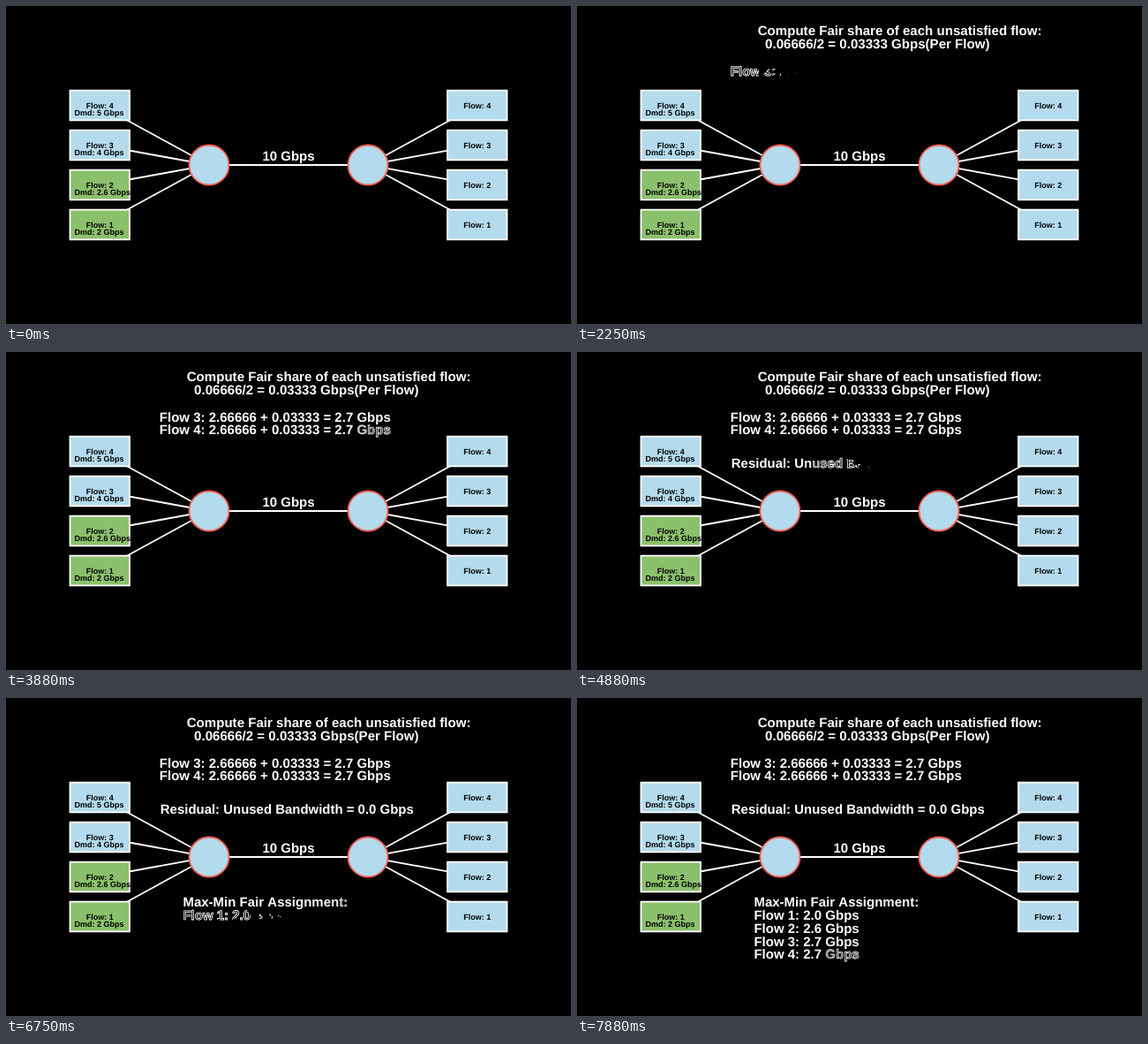
These frames come from a looping animation (640x360 px, 8 s). An HTML page:

```html
<!DOCTYPE html>
<html lang="en">
<head>
<meta charset="utf-8">
<title>Max-min fair share</title>
<style>
  html, body { margin: 0; width: 100%; height: 100%; overflow: hidden; background: #000; }
  svg { display: block; width: 640px; height: 360px; }
  text {
    font: bold 15px "Liberation Sans", Arial, sans-serif;
    font-kerning: none;
    text-rendering: geometricPrecision;
    white-space: pre;
    fill: #fff;
  }
  .label { font-size: 9px; fill: #000; }
  .mid { text-anchor: middle; }
  .link { stroke: #fff; stroke-width: 1.8; }
  .box { fill: #b4dbed; stroke: #fff; stroke-width: 1.8; }
  .done { fill: #8bc06c; }
  .node { fill: #b4dbed; stroke: #fc6255; stroke-width: 1.8; }
  tspan { stroke: #fff; }
</style>
</head>
<body>
<svg id="stage" viewBox="0 0 640 360"></svg>
<script>
const stage = document.getElementById('stage');
const LOOP = 8000, STEP = 125;
const FIRST = 20, WRITE = 2000;   // start of the first block, time to write one block
const PITCH = 14.7, BORDER = 0.9;

function add(parent, tag, attrs, content) {
  const el = document.createElementNS('http://www.w3.org/2000/svg', tag);
  for (const key in attrs) el.setAttribute(key, attrs[key]);
  if (content) el.textContent = content;
  return parent.appendChild(el);
}

// Network diagram
const LEFT = 106.25, RIGHT = 533.75, NODES = [230, 410], MID = 180;
const flows = [
  { id: 4, demand: '5' },
  { id: 3, demand: '4' },
  { id: 2, demand: '2.6', done: true },
  { id: 1, demand: '2', done: true }
].map((flow, i) => ({ ...flow, y: 112.5 + 45 * i }));

function link(x1, y1, x2) {
  add(stage, 'line', { class: 'link', x1, y1, x2, y2: MID });
}

function box(x, y, id, done) {
  add(stage, 'rect', {
    class: done ? 'box done' : 'box',
    x: x - 33.75, y: y - 16.875, width: 67.5, height: 33.75
  });
  add(stage, 'text', { class: 'label mid', x, y: y + 3.3 }, `Flow: ${id}`);
}

for (const { y } of flows) {
  link(LEFT, y, NODES[0]);
  link(RIGHT, y, NODES[1]);
}
link(NODES[0], MID, NODES[1]);
for (const { id, demand, y, done } of flows) {
  box(LEFT, y, id, done);
  box(RIGHT, y, id);
  add(stage, 'text', { class: 'label', x: 77.4, y: y + 11.5 }, `Dmd: ${demand} Gbps`);
}
for (const cx of NODES) add(stage, 'circle', { class: 'node', cx, cy: MID, r: 22.5 });
add(stage, 'text', { class: 'mid', x: 320, y: 175.3 }, '10 Gbps');

// Blocks written letter by letter: border first, then fill
const blocks = [
  { x: 204.7, y: 33.4, size: 15.07, lines: [
    'Compute Fair share of each unsatisfied flow:',
    '  0.06666/2 = 0.03333 Gbps(Per Flow)'] },
  { x: 173.8, y: 78.6, size: 15, lines: [
    'Flow 3: 2.66666 + 0.03333 = 2.7 Gbps',
    'Flow 4: 2.66666 + 0.03333 = 2.7 Gbps'] },
  { x: 174.8, y: 131.2, size: 14.94, lines: [
    'Residual: Unused Bandwidth = 0.0 Gbps'] },
  { x: 200.4, y: 236.4, size: 15, lines: [
    'Max-Min Fair Assignment:',
    'Flow 1: 2.0 Gbps',
    'Flow 2: 2.6 Gbps',
    'Flow 3: 2.7 Gbps',
    'Flow 4: 2.7 Gbps'] }
];

// Rough length of a letter's longest contour
function outline(char) {
  if ('.:-'.includes(char)) return 12;
  if ('=il'.includes(char)) return 26;
  return 'mwMGUR'.includes(char) ? 56 : 38;
}

blocks.forEach((block, i) => {
  block.start = FIRST + i * WRITE;
  block.letters = [];
  block.lines.forEach((line, row) => {
    const text = add(stage, 'text', {
      x: block.x, y: block.y + row * PITCH, style: `font-size:${block.size}px`
    });
    for (const char of line) {
      block.letters.push({ el: add(text, 'tspan', {}, char), length: outline(char), last: -1 });
    }
  });
  block.lag = 4 / (block.letters.length + 1);
});

const clamp = v => Math.min(1, Math.max(0, v));
const sigmoid = v => 1 / (1 + Math.exp(-v));

function smooth(v) {
  const edge = sigmoid(-5);
  return clamp((sigmoid(10 * (v - 0.5)) - edge) / (1 - 2 * edge));
}

function pose(letter, alpha) {
  if (alpha === letter.last) return;
  letter.last = alpha;
  const drawn = smooth(clamp(alpha * 2));
  const filled = smooth(clamp(alpha * 2 - 1));
  const style = letter.el.style;
  style.fillOpacity = filled;
  style.strokeOpacity = drawn > 0 && filled < 1 ? 1 : 0;
  style.strokeWidth = BORDER * (1 - filled);
  style.strokeDasharray = drawn < 1 ? `${drawn * letter.length} 999` : 'none';
}

function render(time) {
  for (const { start, lag, letters } of blocks) {
    const span = 1 + (letters.length - 1) * lag;
    const progress = clamp((time - start) / WRITE) * span;
    letters.forEach((letter, i) => pose(letter, clamp(progress - i * lag)));
  }
}

const origin = performance.now();
function tick() {
  const time = (performance.now() - origin) % LOOP;
  render(Math.floor(time / STEP) * STEP);
  requestAnimationFrame(tick);
}
tick();
</script>
</body>
</html>
```
